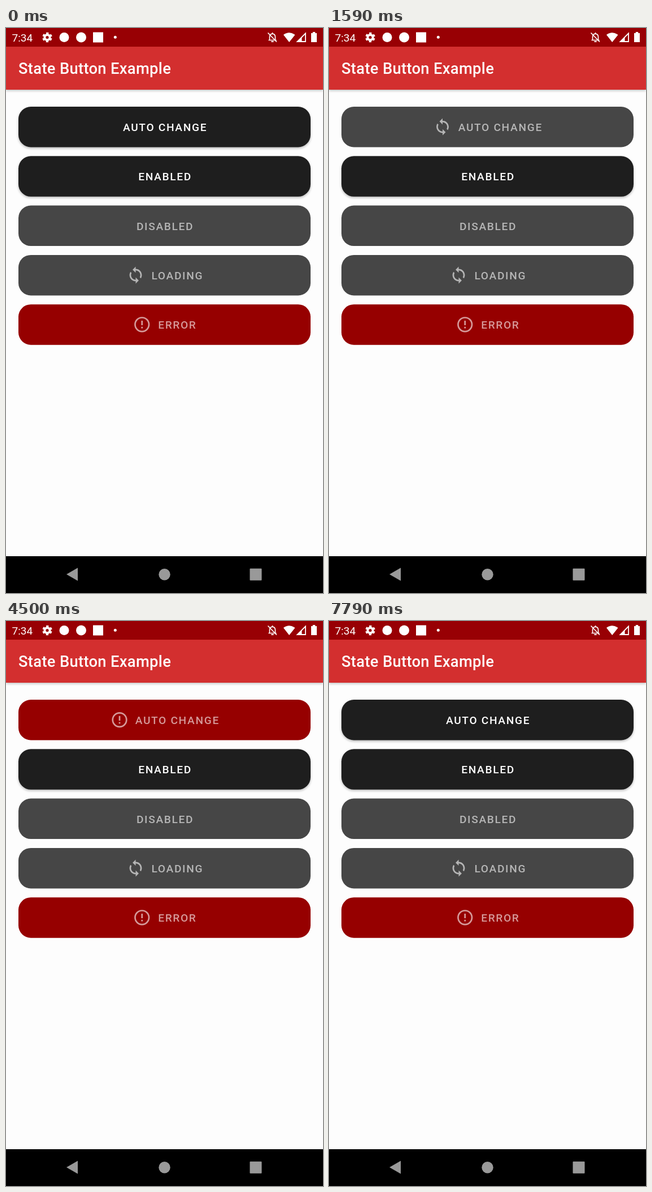
An HTML page for the animation above (7.92 s loop, 561 by 998 pixels).

```html
<!DOCTYPE html>
<html lang="en">
<head>
<meta charset="utf-8">
<title>State Button Example</title>
<style>
  html, body { margin: 0; width: 100%; height: 100%; overflow: hidden; background: #fdfdfd; }
  svg { display: block; width: 561px; height: 998px; font-family: Roboto, sans-serif; }
  .label { font-size: 19.1px; font-weight: 500; letter-spacing: 1.7px; text-anchor: middle; }
  .shadow { filter: blur(2px); }
</style>
</head>
<body>
<svg viewBox="0 0 561 998" fill="#fff">
  <defs>
    <path id="loading" d="M12 4V1L8 5l4 4V6c3.31 0 6 2.69 6 6 0 1.01-.25 1.97-.7 2.8l1.46 1.46C19.54 15.03 20 13.57 20 12c0-4.42-3.58-8-8-8zm0 14c-3.31 0-6-2.69-6-6 0-1.01.25-1.97.7-2.8L5.24 7.74C4.46 8.97 4 10.43 4 12c0 4.42 3.58 8 8 8v3l4-4-4-4v3z"/>
    <g id="error">
      <circle cx="12" cy="12" r="9" fill="none" stroke="#fff" stroke-width="2"/>
      <path d="M11 7h2v6h-2zM11 15h2v2h-2z"/>
    </g>
  </defs>

  <rect width="561" height="998" fill="#fdfdfd"/>
  <rect class="shadow" y="100" width="561" height="11" fill="#000" opacity=".22"/>
  <rect y="33" width="561" height="76" fill="#d32f2f"/>
  <rect width="561" height="33" fill="#980004"/>
  <text x="22" y="81.3" font-size="27.3" font-weight="500" letter-spacing=".34">State Button Example</text>

  <!-- status bar -->
  <text x="10.5" y="23.5" font-size="19.1">7:34</text>
  <g fill="none" stroke="#fff">
    <circle cx="73" cy="16.5" r="4.6" stroke-width="4"/>
    <circle cx="73" cy="16.5" r="7.2" stroke-width="3.2" stroke-dasharray="4 3.54" stroke-dashoffset="-1.77"/>
  </g>
  <circle cx="103" cy="16.5" r="8.5"/>
  <circle cx="133" cy="16.5" r="9"/>
  <rect x="154" y="7.5" width="18" height="18"/>
  <circle cx="193.3" cy="16.3" r="2.5"/>
  <g fill="none" stroke="#fff" stroke-width="1.7">
    <path d="M464.5 21.5h14M466.5 21v-5q0-5 5-5.8q5 .8 5 5.8v5M463.5 8.5l15.5 16M471.5 10v-2"/>
    <path d="M469.5 24h4" stroke-width="2"/>
  </g>
  <path d="M491 12Q501.200 4.500 511.500 12L501.200 25Z"/>
  <path d="M515.500 24H530V9.500Z" fill="none" stroke="#fff" stroke-width="1.8"/>
  <path d="M514 25H523.500V15.500Z"/>
  <path d="M540 9h2.800v-2h4.400v2h2.800v16h-10z"/>

  <g id="buttons"></g>

  <!-- navigation bar -->
  <rect y="933" width="561" height="65" fill="#000"/>
  <g fill="#999">
    <path d="M107 965L127 953.500V976.500Z"/>
    <circle cx="280.500" cy="965.300" r="10.200"/>
    <rect x="431.500" y="954.700" width="21" height="21" rx="1"/>
  </g>
</svg>
<script>
const LOOP = 7920, FADE = 500, LIFT = 100;
const STATES = {
  enabled:  { rgb: [30, 30, 30], alpha: 1, lift: 1 },
  disabled: { rgb: [70, 70, 70], alpha: .6, lift: 0 },
  loading:  { rgb: [70, 70, 70], alpha: .6, lift: 0, icon: 'loading' },
  error:    { rgb: [150, 0, 0], alpha: .6, lift: 0, icon: 'error' }
};
const STEPS = [[-980, 'enabled'], [1050, 'loading'], [3015, 'error'], [4975, 'disabled'], [6940, 'enabled']];

const mix = (a, b, k) => a + (b - a) * k;
// Colour channels blend in linear light.
const mixRgb = (a, b, k) => a.map((v, i) =>
  Math.round(mix((v / 255) ** 2.2, (b[i] / 255) ** 2.2, k) ** (1 / 2.2) * 255));

function makeButton(row, label, iconX) {
  const y = 139 + row * 87.3;
  const box = `x="22" width="517" height="71.5" rx="22"`;
  const g = document.createElementNS('http://www.w3.org/2000/svg', 'g');
  g.innerHTML = `
    <rect class="shadow" ${box} y="${y + 2}" fill="#000" opacity="0"/>
    <rect ${box} y="${y}"/>
    <g><use transform="translate(${iconX - 16.36} ${y + 19.2}) scale(1.363)"/>
    <text class="label" y="${y + 43}">${label}</text></g>`;
  document.getElementById('buttons').append(g);
  const [shadow, body, content] = g.children;
  const [icon, text] = content.children;
  return ({ rgb, alpha, lift, icon: name }) => {
    shadow.setAttribute('opacity', lift * .28);
    body.setAttribute('fill', `rgb(${rgb})`);
    content.setAttribute('opacity', alpha);
    icon.setAttribute('href', name ? '#' + name : '');
    icon.setAttribute('display', name ? 'inline' : 'none');
    text.setAttribute('x', name ? 303.3 : 281.6);
  };
}

const drawAuto = makeButton(0, 'AUTO CHANGE', 201);
makeButton(1, 'ENABLED', 0)(STATES.enabled);
makeButton(2, 'DISABLED', 0)(STATES.disabled);
makeButton(3, 'LOADING', 229.5)(STATES.loading);
makeButton(4, 'ERROR', 240.7)(STATES.error);

function autoState(t) {
  const i = STEPS.findLastIndex(([start]) => t >= start);
  const to = STATES[STEPS[i][1]];
  const from = i ? STATES[STEPS[i - 1][1]] : to;
  const age = t - STEPS[i][0];
  const k = (1 - Math.cos(Math.PI * Math.min(age / FADE, 1))) / 2;
  return {
    rgb: mixRgb(from.rgb, to.rgb, k),
    alpha: mix(from.alpha, to.alpha, k),
    lift: mix(from.lift, to.lift, Math.min(age / LIFT, 1)),
    icon: to.icon
  };
}

const origin = performance.now();
function frame() {
  drawAuto(autoState((performance.now() - origin) % LOOP));
  requestAnimationFrame(frame);
}
frame();
</script>
</body>
</html>
```
